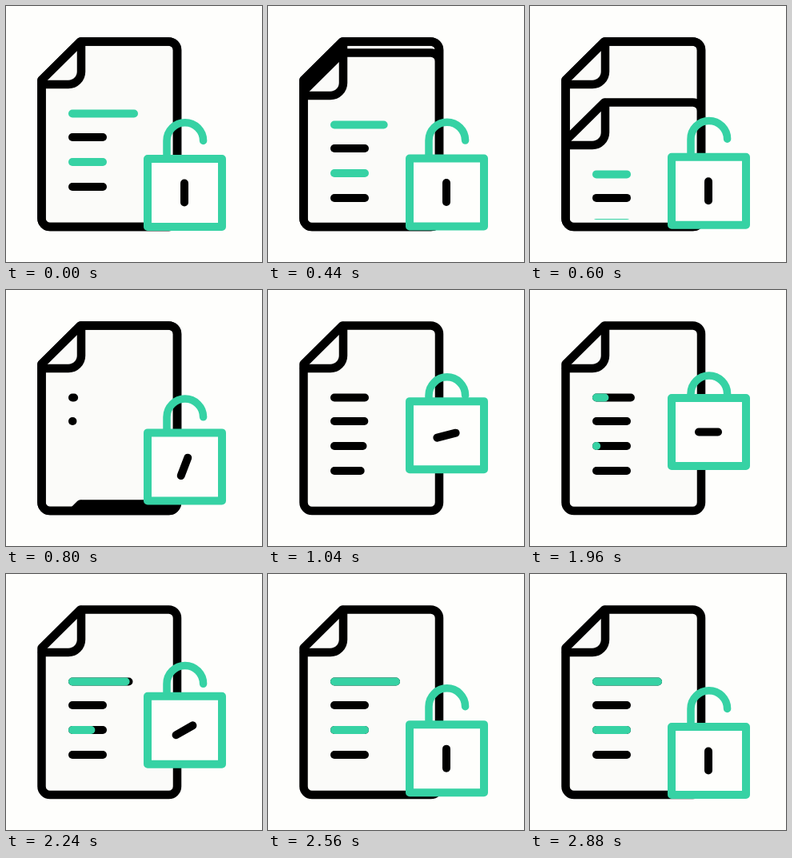
These frames come from a looping animation (320 px wide and 320 px high, 2.92 s). An HTML page with a canvas:

```html
<!DOCTYPE html>
<html lang="en">
<head>
<meta charset="utf-8">
<title>Document unlock</title>
<style>
  html, body { margin: 0; width: 100%; height: 100%; overflow: hidden; background: #fefefc; }
  canvas { display: block; width: 320px; height: 320px; }
</style>
</head>
<body>
<canvas id="stage"></canvas>
<script>
const LOOP = 2920, STEP = 40, CLOSE = 320, OPEN = 1840;
const BLACK = '#000', GREEN = '#36d2a4', PAPER = '#fbfbf9', BACK = '#fefefc';
const ROWS = [134.5, 164, 195, 226];
const LEFT = 83, SHORT = 121, LONG = 160;

const canvas = document.getElementById('stage');
const ctx = canvas.getContext('2d');
const ratio = window.devicePixelRatio || 1;
canvas.width = canvas.height = 320 * ratio;

const sheet = new Path2D('M93 44.5H203.500a10.500 10.500 0 0 1 10.500 10.500V265.500a10.500 10.500 0 0 1-10.500 10.500H55a10.500 10.500 0 0 1-10.500-10.500V92.500Z');
const fold = new Path2D('M94 45V82a16 16 0 0 1-16 16H45');
const shackle = new Path2D('M201 200V168.500a22.800 22.800 0 0 1 45.600 0');
const inside = new Path2D('M39 39H219V267H39Z');

// Progress of the closing and opening moves: [ms, value] pairs.
const closing = {
  lift: [[0, 0], [280, .04], [520, .28], [720, .91], [860, 1.15], [1040, 1]],
  turn: [[280, 0], [520, .3], [720, .84], [880, 1]],
  shut: [[360, 0], [720, .79], [860, 1]]
};
const opening = {
  lift: [[0, 0], [280, .08], [400, .33], [520, .75], [620, 1.14], [720, .95], [860, 1.02], [1040, 1]],
  turn: [[120, 0], [400, .33], [680, 1]],
  shut: [[0, 0], [400, .63], [600, 1]]
};

const clamp = x => Math.min(1, Math.max(0, x));
const smooth = x => (x = clamp(x), x * x * (3 - 2 * x));
const mix = (a, b, p) => a + (b - a) * p;

// Smooth curve through the points, flat at the ends and at turning points.
function track(points, t) {
  const last = points.length - 1;
  if (t <= points[0][0]) return points[0][1];
  if (t >= points[last][0]) return points[last][1];
  const slope = i => (points[i + 1][1] - points[i][1]) / (points[i + 1][0] - points[i][0]);
  const tangent = i => {
    if (i === 0 || i === last) return 0;
    const a = slope(i - 1), b = slope(i);
    return a * b > 0 ? 2 * a * b / (a + b) : 0;
  };
  const i = points.findIndex(p => p[0] > t) - 1;
  const [t0, v0] = points[i], [t1, v1] = points[i + 1];
  const d = t1 - t0, u = (t - t0) / d, w = 1 - u;
  return mix(v0, v1, smooth(u)) + d * u * w * (w * tangent(i) - u * tangent(i + 1));
}

function stroke(path, color, width) {
  ctx.strokeStyle = color;
  ctx.lineWidth = width;
  ctx.stroke(path);
}

function row(i, end, color) {
  if (end <= LEFT) return;
  const path = new Path2D();
  path.moveTo(LEFT, ROWS[i]);
  path.lineTo(end, ROWS[i]);
  stroke(path, color, 10);
}

function page() {
  ctx.fillStyle = PAPER;
  ctx.fill(sheet);
  stroke(sheet, BLACK, 10.5);
  stroke(fold, BLACK, 10.5);
}

// The written page drops away, then new rows grow on the blank one.
function drawClosingPage(r) {
  page();
  ROWS.forEach((y, i) => row(i, mix(LEFT, SHORT, smooth((r - 440 - 22 * i) / 280)), BLACK));
  const drop = 242 * clamp(r / 500) ** 2;
  if (drop >= 242) return;
  ctx.save();
  ctx.clip(sheet);
  ctx.translate(0, drop);
  page();
  ctx.translate(0, -drop);
  if (drop) ctx.clip(inside);
  ctx.translate(0, drop);
  ROWS.forEach((y, i) => row(i, i ? SHORT : mix(LONG, SHORT, smooth(r / 280)), i % 2 ? BLACK : GREEN));
  ctx.restore();
  stroke(sheet, BLACK, 10.5);
}

function drawOpeningPage(r) {
  page();
  ROWS.forEach((y, i) => row(i, i ? SHORT : mix(SHORT, LONG, smooth(r / 540)), BLACK));
  row(0, mix(LEFT, LONG, smooth(r / 520)), GREEN);
  row(2, mix(LEFT, SHORT, smooth((r - 100) / 520)), GREEN);
}

function drawLock(lift, turn, shut) {
  ctx.save();
  ctx.translate(0, -57 * lift);
  ctx.save();
  ctx.translate(0, 19 * shut);
  stroke(shackle, GREEN, 9.5);
  ctx.restore();
  const body = new Path2D('M177 191H270V276H177Z');
  ctx.fillStyle = BACK;
  ctx.fill(body);
  stroke(body, GREEN, 10);
  ctx.translate(223, 233.5);
  ctx.rotate((turn - 1) * Math.PI / 2);
  stroke(new Path2D('M-12 0H12'), BLACK, 10);
  ctx.restore();
}

function draw(now) {
  const t = Math.floor(now % LOOP / STEP) * STEP;
  const shutting = t < OPEN;
  const r = t - (shutting ? CLOSE : OPEN);
  const moves = shutting ? closing : opening;
  const [lift, turn, shut] = ['lift', 'turn', 'shut'].map(name => {
    const p = track(moves[name], r);
    return shutting ? p : 1 - p;
  });

  ctx.setTransform(ratio, 0, 0, ratio, 0, 0);
  ctx.fillStyle = BACK;
  ctx.fillRect(0, 0, 320, 320);
  ctx.lineCap = ctx.lineJoin = 'round';
  (shutting ? drawClosingPage : drawOpeningPage)(r);
  drawLock(lift, turn, shut);
}

const start = performance.now();
function loop() {
  draw(performance.now() - start);
  requestAnimationFrame(loop);
}
loop();
</script>
</body>
</html>
```
